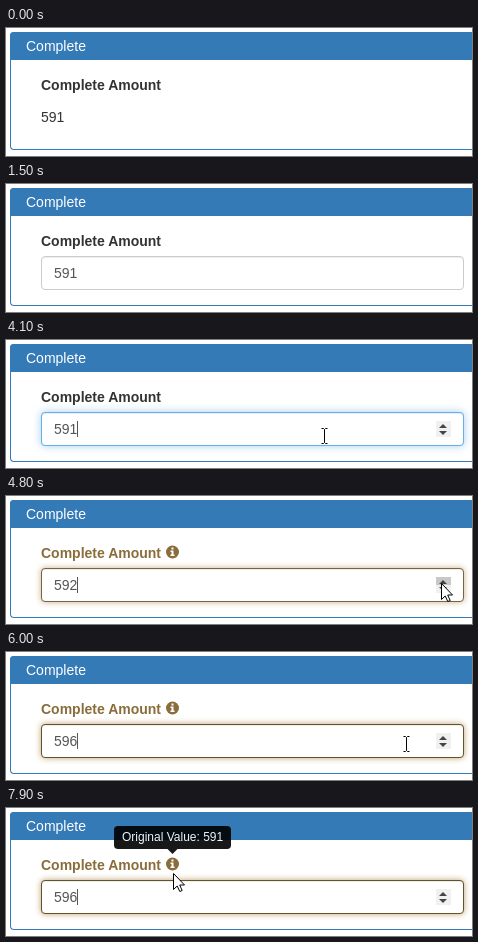
These frames come from a looping animation (466x128 px, 8 s). An HTML page:

```html
<!DOCTYPE html>
<html lang="en">
<head>
<meta charset="utf-8">
<title>Editable amount</title>
<style>
html, body { margin: 0; width: 466px; height: 128px; overflow: hidden; background: #fff; }
div, svg { position: absolute; box-sizing: border-box; }
.panel { left: 4px; top: 4px; width: 462px; height: 118px; border: 1px solid #337ab7; border-right: 0; border-radius: 4px 0 0 4px; }
.head { left: 4px; top: 4px; width: 462px; height: 28px; background: #337ab7; border-radius: 4px 0 0 0; }
.field { left: 35px; top: 72px; width: 423px; height: 34px; border: 1px solid #ccc; border-radius: 4px;
  background: #fff; box-shadow: inset 0 1px 1px rgba(0,0,0,.075); }
#focus { border-color: #66afe9; box-shadow: inset 0 1px 1px rgba(0,0,0,.075), 0 0 8px rgba(102,175,233,.6); }
#warn { border-color: #66512c; box-shadow: inset 0 1px 1px rgba(0,0,0,.075), 0 0 6px #c0a16b; }
svg { left: 0; top: 0; }
text { font: 14px "Liberation Sans", Arial, sans-serif; }
</style>
</head>
<body>
<div class="panel"></div>
<div class="head"></div>
<div class="field" id="field"></div>
<div class="field" id="focus"></div>
<div class="field" id="warn"></div>
<svg width="466" height="128">
  <text x="20" y="23" fill="#fff">Complete</text>
  <text id="label" x="35" y="62" style="font-weight:bold">Complete Amount</text>
  <text id="value" y="94"></text>
  <rect id="caret" x="71" y="81" width="1" height="16" fill="#555"/>
  <g id="spinner">
    <rect x="430" y="81" width="15" height="16" fill="#f0f0f0"/>
    <rect id="up" x="430" y="81" width="15" height="8"/>
    <path d="M433 88l4-4 4 4zM433 91h8l-4 4z" fill="#444"/>
  </g>
  <g id="icon">
    <circle cx="166.500" cy="56" r="6.500" fill="#8a6d3b"/>
    <path d="M165.500 51.500h2v2h-2zM164.500 54.500h3v4h1v1.500h-4v-1.500h1v-2.500h-1z" fill="#fff"/>
  </g>
  <g id="tip">
    <rect x="108" y="18" width="117" height="23" rx="4"/>
    <path d="M161.500 41h10l-5 5z"/>
    <text x="116" y="33" fill="#fff" style="font-size:12px">Original Value: 591</text>
  </g>
  <path id="arrow" d="M.5.5v16l3.700-3.500 2.600 5.500 2.400-1-2.500-5.500h4.800z" fill="#fff" stroke="#000"/>
  <path id="beam" d="M-3-7.500h2l1 1 1-1h2M-3 7.500h2l1-1 1 1h2M0-6.500v13" fill="none" stroke="#000"/>
</svg>
<script>
const $ = id => document.getElementById(id);
const show = (id, on) => $(id).style.display = on ? '' : 'none';
const fade = (id, p) => $(id).style.opacity = p;
const clamp = (v, lo, hi) => Math.min(hi, Math.max(lo, v));
const STEP = 100, LOOP = 8000;
const EDIT = 1500, FOCUS = 2900, CLICK = 4700, RELEASE = 5700;

// Pointer waypoints: time, x, y. It waits below the stage when out of sight.
const path = [
  [0, 398, 140], [100, 398, 96], [200, 398, 140],
  [1800, 300, 128], [2400, 143, 94],
  [3800, 143, 94], [4100, 318, 96], [4400, 435, 87],
  [5900, 435, 87], [6400, 259, 112],
  [6600, 259, 112], [6700, 252, 103], [7200, 165, 56],
  [7700, 165, 56], [7900, 167, 65], [LOOP, 167, 65]
];

function pointer(t) {
  const i = path.findIndex(p => p[0] > t);
  const [t0, x0, y0] = path[i - 1], [t1, x1, y1] = path[i];
  const p = (t - t0) / (t1 - t0);
  return [x0 + (x1 - x0) * p, y0 + (y1 - y0) * p].map(Math.round);
}

function ease(t, start, length) {
  const p = clamp((t - start) / length, 0, 1);
  return p * p * (3 - 2 * p);
}

function caretOn(t) {
  if (t >= CLICK && t < RELEASE) return true;
  const since = t - (t < CLICK ? FOCUS : RELEASE);
  return since >= 0 && since % 1000 < 500;
}

function draw(now) {
  const t = Math.floor(now % LOOP / STEP) * STEP;
  const [x, y] = pointer(t);
  const editing = t >= EDIT, changed = t >= CLICK;
  const inField = editing && x > 35 && x < 458 && y > 72 && y < 106;
  const onSpinner = inField && x >= 430;
  const beam = inField && !onSpinner;

  show('field', editing);
  show('focus', !changed);
  fade('focus', ease(t, FOCUS - 150, 300));
  fade('warn', ease(t, CLICK - 50, 200));
  $('label').setAttribute('fill', changed ? '#8a6d3b' : '#333');
  show('icon', changed);

  $('value').textContent = 591 + clamp(Math.floor((t - CLICK) / 225) + 1, 0, 5);
  $('value').setAttribute('x', editing ? 48 : 35);
  $('value').setAttribute('fill', editing ? '#555' : '#333');
  show('caret', caretOn(t));

  show('spinner', inField || t >= FOCUS);
  show('up', onSpinner);
  $('up').setAttribute('fill', changed && t <= RELEASE ? '#c8c8c8' : '#dcdcdc');

  fade('tip', .9 * ease(t, 6900, 300));
  show('beam', beam);
  show('arrow', !beam);
  $('beam').setAttribute('transform', `translate(${x + .5} ${y})`);
  $('arrow').setAttribute('transform', `translate(${x} ${y})`);
}

const start = performance.now();
function tick() {
  draw(performance.now() - start);
  requestAnimationFrame(tick);
}
tick();
</script>
</body>
</html>
```
